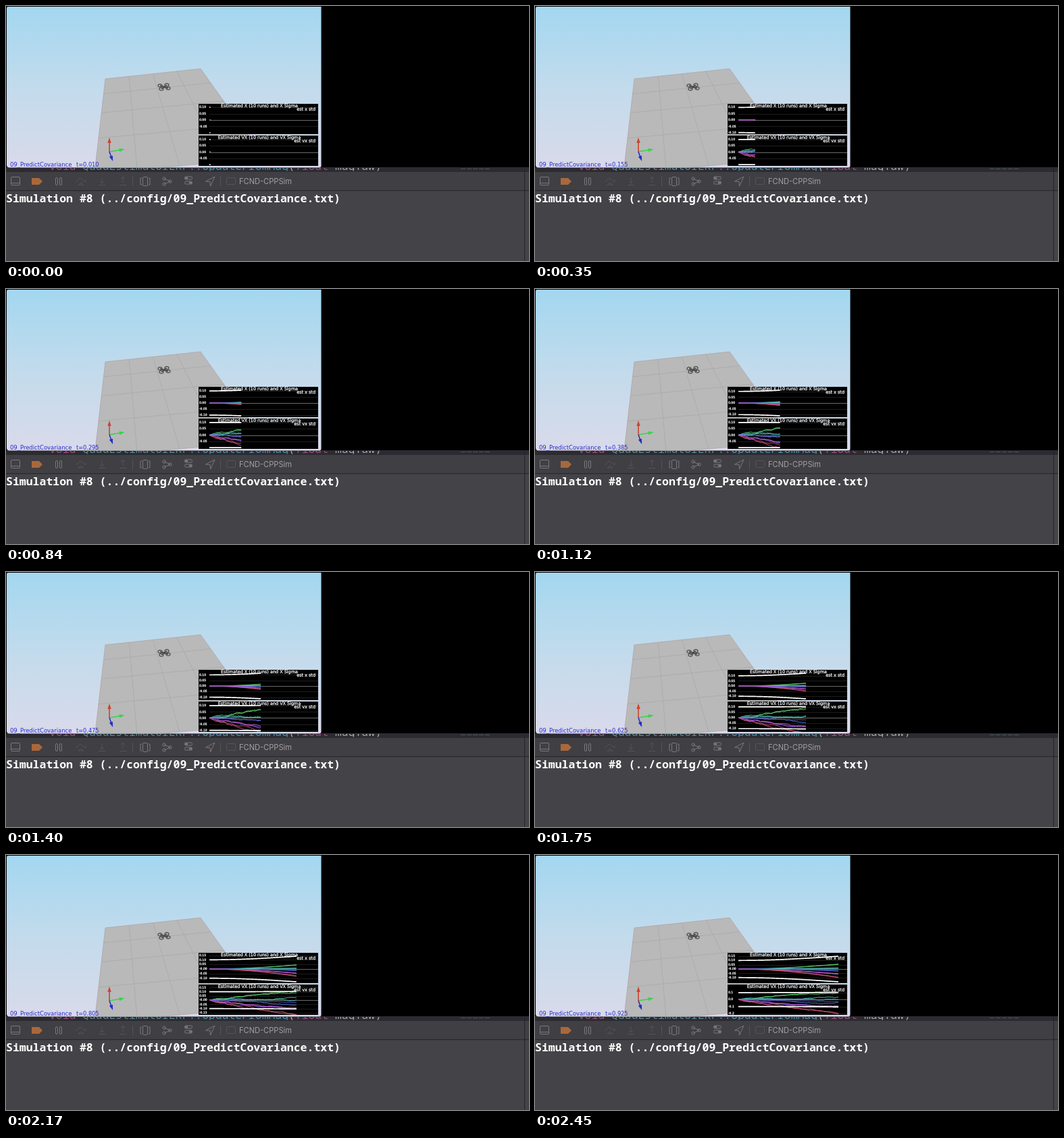
Recreate the animation shown at these times as an HTML page with a canvas. Size 774 by 378 pixels, loop 2520 ms.

```html
<!DOCTYPE html>
<html>
<head>
<meta charset="utf-8">
<style>
html, body { margin: 0; width: 100%; height: 100%; overflow: hidden; background: #000; }
canvas { display: block; }
</style>
</head>
<body>
<canvas id="stage" width="774" height="378"></canvas>
<script>
const c = document.getElementById('stage').getContext('2d');
const SANS = '"DejaVu Sans", sans-serif';
const MONO = '"Noto Sans Mono", "DejaVu Sans Mono", monospace';
const LOOP = 2520, STEP = 70, DT = 0.005;

function rect(x, y, w, h, color) {
  c.fillStyle = color;
  c.fillRect(x, y, w, h);
}
function trace(points) {
  c.beginPath();
  points.forEach(([x, y]) => c.lineTo(x, y));
}
function line(points, color, width = 1) {
  trace(points);
  c.strokeStyle = color;
  c.lineWidth = width;
  c.stroke();
}
function poly(points, color) {
  trace(points);
  c.fillStyle = color;
  c.fill();
}
function oval(x, y, rx, ry, color, width = 1) {
  c.beginPath();
  c.ellipse(x, y, rx, ry, 0, 0, 7);
  c.strokeStyle = color;
  c.lineWidth = width;
  c.stroke();
}
function box(x, y, w, h, color, radius = 1.5) {
  c.beginPath();
  c.roundRect(x, y, w, h, radius);
  c.strokeStyle = color;
  c.lineWidth = 1;
  c.stroke();
}
function text(str, x, y, font, color, align = 'left') {
  c.font = font;
  c.textAlign = align;
  c.fillStyle = color;
  c.fillText(str, x, y);
}
function plotText(str, x, y, size, align) {
  text(str, x, y, size + 'px ' + SANS, '#fff', align);
  c.strokeStyle = '#fff';
  c.lineWidth = .25;
  c.strokeText(str, x, y);
}

let seed = 9;
function random() {
  seed = seed * 16807 % 2147483647;
  return seed / 2147483647;
}

// Velocity is a steady drift plus a random walk; position is its integral.
const runs = Array.from({ length: 10 }, (_, i) => {
  const vel = [], pos = [];
  let walk = 0, x = 0;
  for (let k = 0; k <= 200; k++) {
    const v = (.12 - .04 * i) * k * DT + walk;
    vel.push(v);
    pos.push(x += v * DT);
    walk += (random() - .5) * .006;
  }
  return { color: `hsl(${110 + 27 * i} 62% 60%)`, vel, pos };
});
const sigma = {
  pos: t => Math.hypot(.1, .12 * t),
  vel: t => .1 + .006 * t * t
};

const simKeys = [[0, .01], [5, .155], [12, .295], [20, .475], [35, .925]];
function simTime(tick) {
  const i = Math.max(1, simKeys.findIndex(([key]) => key >= tick));
  const [k0, t0] = simKeys[i - 1], [k1, t1] = simKeys[i];
  return Math.round((t0 + (t1 - t0) * (tick - k0) / (k1 - k0)) / DT) * DT;
}

// zero: height of the zero line, unit: pixels per 0.1
function plot(top, name, kind, zero, unit, t) {
  const step = unit < 11 ? .1 : .05;
  const py = value => zero - value * unit * 10;
  const count = Math.round(t / DT);
  const curve = fn => Array.from({ length: count + 1 }, (_, k) => [301 + 160 * k * DT, py(fn(k))]);
  c.save();
  c.beginPath();
  c.rect(285, top, 177, 45);
  c.clip();
  rect(285, top, 177, 45, '#000');
  c.textBaseline = 'middle';
  for (let n = -4; n <= 4; n++) {
    const y = py(n * step);
    if (y < top + 2 || y > top + 42.95) continue;
    const sign = !n && step < .1 && t > .7 ? '-' : '';
    plotText(sign + (n * step).toFixed(step < .1 ? 2 : 1), 286, y, 4.5, 'left');
    rect(301, Math.round(y), 161, 1, n ? '#1e1e1e' : '#6a6a6a');
  }
  c.textBaseline = 'alphabetic';
  for (const run of runs) line(curve(k => run[kind][k]), run.color);
  line(curve(k => runs[5][kind][k] / 4), runs[5].color);
  for (const sign of [1, -1]) line(curve(k => sign * sigma[kind](k * DT)), '#fff', 1.7);
  plotText(`Estimated ${name} (10 runs) and ${name} Sigma`, 375, top + 5.3, 6.48, 'center');
  plotText(`est ${name.toLowerCase()} std`, 458, top + 10.3, 6.48, 'right');
  c.restore();
}

// Floor point in perspective; u runs along an edge, v towards the viewer, both 0 to 1
function floor(u, v) {
  const s = v / (v + (1 - v) * 1.78);
  return [147 - 16 * s + u * (141 + 111 * s), 108 + 140 * s - u * (15 + 7 * s)];
}

function arrow(angle, length, color) {
  c.save();
  c.translate(153, 216);
  c.rotate(angle);
  line([[0, 0], [length - 6, 0]], color, 1.6);
  poly([[length - 8, -2.7], [length, 0], [length - 8, 2.7]], color);
  c.restore();
}

function scene() {
  const sky = c.createLinearGradient(0, 1, 0, 239);
  sky.addColorStop(0, '#a3d7f0');
  sky.addColorStop(.5, '#c2dbec');
  sky.addColorStop(1, '#d9daea');
  c.save();
  c.beginPath();
  c.roundRect(1, 1, 465.5, 238.5, [2, 0, 3, 4]);
  c.clip();
  rect(0, 0, 467, 240, sky);

  poly([floor(0, 0), floor(1, 0), floor(1, 1), floor(0, 1)], '#b9b9ba');
  for (let i = 0; i <= 4; i++) {
    const color = i % 4 ? '#a9a9aa' : '#b0a4a2';
    line([floor(i / 4, 0), floor(i / 4, 1)], color, .8);
    line([floor(0, i / 4), floor(1, i / 4)], color, .8);
  }

  for (const [dx, dy] of [[6, 2], [-4, 3]]) {
    line([[234 - dx, 120 - dy], [234 + dx, 120 + dy]], '#444', 1.5);
    for (const side of [-1, 1]) oval(234 + side * dx, 120 + side * dy, 3, 2.1, '#4c4c4c', 1.2);
  }
  rect(232.5, 118.5, 3, 3, '#444');

  arrow(-.16, 23, '#35d54a');
  arrow(1.22, 15, '#2530c0');
  arrow(-1.57, 21, '#cc4430');
  c.restore();
}

function toolbar() {
  const on = '#79787c', off = '#545357';
  rect(0, 246, 774, 27, '#403f43');
  rect(0, 273, 774, 1.2, '#29282c');
  box(7.5, 253.5, 13, 12, on);
  line([[8, 262.5], [20, 262.5]], on);
  poly([[38, 255], [49, 255], [54, 260], [49, 265], [38, 265]], '#a9683c');
  for (const x of [73.5, 79.5]) box(x, 254.5, 3, 11, on);

  line([[103, 261], [110, 255], [118, 261], [118, 257]], off);
  line([[107, 265], [111, 262], [115, 265], [107, 265]], off);
  for (const [x, dir] of [[142, 1], [173, -1]]) {
    line([[x, 254], [x, 262]], off);
    line([[x - 3, 258 + dir * 2], [x, 258 + dir * 5], [x + 3, 258 + dir * 2]], off);
    line([[x - 5, 265.5], [x + 5, 265.5]], off);
  }
  for (const x of [187, 317]) rect(x, 253, 1, 14, off);

  box(202.5, 253.5, 7, 13, on);
  for (const side of [-1, 1]) {
    const x = 206 + side * 5;
    line([[x, 255], [x + side * 2, 255], [x + side * 2, 265], [x, 265]], on);
    line([[234, 260 + side * 4], [243, 260]], on);
    oval(234, 260 + side * 4, 2.2, 2.2, on);
    box(264.5, 258.5 + side * 3.5 - 2, 11, 4, on);
    rect(268 + side * 3, 257 + side * 3.5, 4, 3, on);
  }
  oval(243, 260, 2.2, 2.2, on);
  line([[309, 253], [295.5, 260], [302, 260.5], [302.5, 267], [309, 253]], on);
  box(326.5, 254.5, 13, 10, off);
  text('FCND-CPPSim', 345, 264, '11.1px Inter, sans-serif', '#a09fa3');
}

function editor() {
  rect(0, 239, 774, 139, '#444347');
  rect(0, 239, 774, 7, '#2c2b31');
  c.save();
  c.beginPath();
  c.rect(0, 240, 774, 4.5);
  c.clip();
  let x = 64;
  for (const [word, color] of [['void ', '#9c5080'], ['QuadEstimatorEKF::', '#578a98'],
    ['UpdateFromMag', '#4a90ac'], ['(', '#aaa'], ['float ', '#9c5080'], ['magYaw)', '#a8a8ac']]) {
    text(word, x, 243.3, '16.4px ' + MONO, color);
    x += c.measureText(word).width;
  }
  for (let i = 0; i < 5; i++) rect(673 + 9 * i, 241, 7, 1, '#46565f');
  c.restore();
  toolbar();
  rect(767, 240, 1, 138, '#252428');
  text('Simulation #8 (../config/09_PredictCovariance.txt)', 0, 291, 'bold 16.5px ' + MONO, '#fff');
}

function draw(now) {
  const t = simTime(Math.floor(now % LOOP / STEP));
  const late = Math.max(0, t - .4) ** 2;
  rect(0, 0, 774, 378, '#000');
  editor();
  rect(0, 0, 774, 239, '#000');
  scene();
  plot(145, 'X', 'pos', 169, 1.9 / sigma.pos(t), t);
  plot(192, 'VX', 'vel', 216.5 - 8 * late, 3.8 / (.205 + .6 * late), t);
  text('09_PredictCovariance', 6, 237.7, '8.45px ' + SANS, '#2a2ad0');
  text('t=' + t.toFixed(3), 104, 237.7, '8.2px ' + SANS, '#2a2ad0');
}

const start = performance.now();
function loop() {
  draw(performance.now() - start);
  requestAnimationFrame(loop);
}
loop();
</script>
</body>
</html>
```
